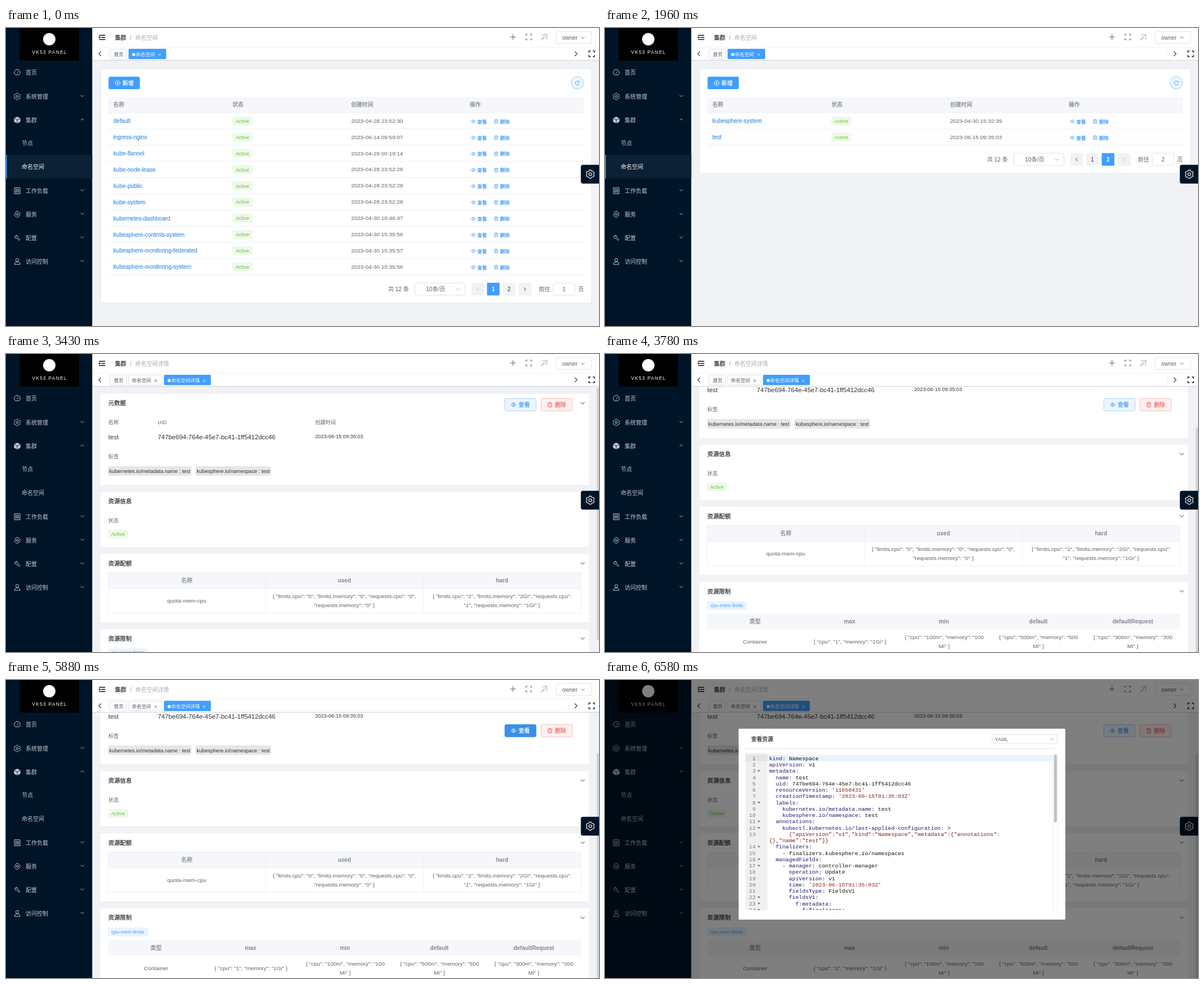
These frames come from a looping animation (1055x531 px, 7140 ms). An HTML page with a canvas:

```html
<!DOCTYPE html>
<html lang="zh-CN">
<head>
<meta charset="utf-8">
<style>
html, body { margin: 0; width: 100%; height: 100%; overflow: hidden; background: #f0f2f5; }
canvas { display: block; }
</style>
</head>
<body>
<canvas id="stage" width="1055" height="531"></canvas>
<script>
const W = 1055, H = 531, LOOP = 7140;
const SANS = '"Liberation Sans", "Noto Sans CJK SC", "Noto Sans CJK", sans-serif';
const MONO = '"Liberation Mono", monospace';
const BLUE = '#409eff', NAVY = '#001428', INK = '#303133', TEXT = '#606266', MUTED = '#909399', LINE = '#ebeef5';
let c = document.getElementById('stage').getContext('2d');

const ICON = {
  down: 'M-3-1.5L0 1.5L3-1.5', up: 'M-3 1.5L0-1.5L3 1.5',
  left: 'M2-4L-2 0L2 4', right: 'M-2-4L2 0L-2 4',
  cross: 'M-2.3-2.3L2.3 2.3M2.3-2.3L-2.3 2.3',
  plus: 'M-5 0H5M0-5V5',
  full: 'M-5-2V-5H-2M2-5H5V-2M5 2V5H2M-2 5H-5V2',
  wand: 'M-5.5 5.5L.5-.5M1-5.5V-3.2M3.2-1H5.5M-3.6-4.6L-1.6-2.8M5-5L2.6-2.6M2.8 1.6L4.6 3.6',
  fold: 'M-5.5-3.7H5.5M-1.2 0H5.5M-5.5 3.7H5.5M-4.9-.7L-3.4 0L-4.9 .7Z',
  eye: 'M-5 0Q0-7 5 0Q0 7-5 0ZM1.7 0A1.7 1.7 0 1 1-1.7 0A1.7 1.7 0 1 1 1.7 0',
  trash: 'M-4.5-3H4.5M-1.7-3V-4.6H1.7V-3M-3.5-3V4.6H3.5V-3M-1.2-.8V2.6M1.2-.8V2.6',
  add: 'M4.2 0A4.2 4.2 0 1 1-4.2 0A4.2 4.2 0 1 1 4.2 0M-2 0H2M0-2V2',
  reload: 'M3.2-1.8A3.7 3.7 0 1 0 3.6 1M3.5-4V-1.7H1.2',
  gauge: 'M-3.4 4.3A5.3 5.3 0 1 1 3.4 4.3ZM0 1.5L2-1.8',
  hexagon: 'M0-5.6L5.2-2.9V2.9L0 5.6L-5.2 2.9V-2.9Z',
  edges: 'M-5.2-2.9L0-.2L5.2-2.9M0-.2V5.6',
  sliders: 'M-5-5.3H5V5.3H-5ZM-2.4-3.5V3.5M0-3.5V3.5M2.4-3.5V3.5M-3.2 1.5H-1.6M-.8-1.5H.8M1.6 1H3.2',
  flower: 'M1.6 0A1.6 1.6 0 1 1-1.6 0A1.6 1.6 0 1 1 1.6 0M0-5.3C3-5.3 2-2.7 3.5-2.7S6 0 4 0S6 3 3.5 3S3 5.3 0 5.3S-2 3-3.5 3S-6 0-4 0S-5-2.7-3.5-2.7S-3-5.3 0-5.3',
  wrench: 'M-1-4.6A3.2 3.2 0 0 0-4.3-.6A3.2 3.2 0 0 0-.8 .5L3.2 4.6L4.8 3L.6-1A3.2 3.2 0 0 0-.4-4.4L-2.2-2.4L-3-3.2',
  user: 'M2.7-2.6A2.7 2.7 0 1 1-2.7-2.6A2.7 2.7 0 1 1 2.7-2.6M-5 5.2Q-5 .8 0 .8Q5 .8 5 5.2Z',
  gear: gearPath(5.4)
};

function gearPath(r) {
  let d = '';
  for (let i = 0; i < 48; i++) {
    const a = i * Math.PI / 24, k = r * (1 + 0.11 * Math.tanh(3 * Math.cos(6 * a + Math.PI)));
    d += (i ? 'L' : 'M') + (k * Math.cos(a)).toFixed(2) + ' ' + (k * Math.sin(a)).toFixed(2);
  }
  return d + 'ZM2 0A2 2 0 1 1-2 0A2 2 0 1 1 2 0';
}

// timing helpers
const ramp = (t, a, b) => Math.min(1, Math.max(0, (t - a) / (b - a)));
const smooth = p => p * p * (3 - 2 * p);
function ease(p) {
  // CSS "ease": cubic-bezier(.25, .1, .25, 1)
  let lo = 0, hi = 1, u = p;
  for (let i = 0; i < 18; i++) {
    u = (lo + hi) / 2;
    const x = 0.75 * u * (1 - u) + u * u * u;
    if (x < p) lo = u; else hi = u;
  }
  return 0.3 * u * (1 - u) * (1 - u) + 3 * u * u * (1 - u) + u * u * u;
}
const hex = s => [1, 3, 5].map(i => parseInt(s.substr(i, 2), 16));
function mix(a, b, p) {
  const x = hex(a), y = hex(b);
  return `rgb(${x.map((v, i) => Math.round(v + (y[i] - v) * p))})`;
}

// drawing helpers; y of text is its optical middle
function text(s, x, y, color, size = 10, align = 'left', weight = 400, font = SANS) {
  c.font = `${weight} ${size}px ${font}`;
  c.textAlign = align;
  c.fillStyle = color;
  c.fillText(s, x, y + size * 0.36);
  if (weight === 500) {
    c.strokeStyle = color;
    c.lineWidth = 0.25;
    c.strokeText(s, x, y + size * 0.36);
  }
}
function rect(x, y, w, h, color) {
  c.fillStyle = color;
  c.fillRect(x, y, w, h);
}
function box(x, y, w, h, r, fill, border) {
  c.beginPath();
  c.roundRect(x, y, w, h, r);
  if (fill) { c.fillStyle = fill; c.fill(); }
  if (border) { c.strokeStyle = border; c.lineWidth = 0.9; c.stroke(); }
}
function dot(x, y, r, fill) {
  c.beginPath();
  c.arc(x, y, r, 0, 7);
  c.fillStyle = fill;
  c.fill();
}
function icon(name, x, y, color, scale = 1, width = 1, fill) {
  const path = new Path2D(ICON[name]);
  c.save();
  c.translate(x, y);
  c.scale(scale, scale);
  c.strokeStyle = color;
  c.lineWidth = width / scale;
  if (fill) { c.fillStyle = fill; c.fill(path); }
  c.stroke(path);
  c.restore();
}
const pool = [];
let depth = 0;
function layer(alpha, dx, dy, draw) {
  if (alpha <= 0) return;
  const outer = c;
  if (alpha < 1) {
    const cv = pool[depth] || (pool[depth] = Object.assign(document.createElement('canvas'), { width: W, height: H }));
    c = cv.getContext('2d');
    c.clearRect(0, 0, W, H);
  }
  depth++;
  c.save();
  c.translate(dx, dy);
  draw();
  c.restore();
  depth--;
  if (alpha < 1) {
    const cv = c.canvas;
    c = outer;
    c.globalAlpha = alpha;
    c.drawImage(cv, 0, 0);
    c.globalAlpha = 1;
  }
}

const MENU = [
  ['首页', 79, 'gauge'], ['系统管理', 122, 'gear', 'down'], ['集群', 164, 'cube', 'up'],
  ['工作负载', 290, 'sliders', 'down'], ['服务', 332, 'flower', 'down'],
  ['配置', 374, 'wrench', 'down'], ['访问控制', 416, 'user', 'down']
];
function sidebar(t) {
  const width = 153.4;
  rect(0, 0, width, H, NAVY);
  rect(24, 0, 106, 58, '#000');
  dot(77, 20, 11, '#fff');
  c.letterSpacing = '1.3px';
  text('VK53 PANEL', 77.5, 43, '#fff', 8.4, 'center');
  c.letterSpacing = '0px';
  const on = 1 - ramp(t, 2430, 2660), grey = '#c3cad3';
  c.globalAlpha = on;
  rect(0, 226, width, 42, '#0c2135');
  rect(0, 226, 1.5, 42, BLUE);
  c.globalAlpha = 1;
  for (const [label, y, pic, arrow] of MENU) {
    if (pic === 'cube') {
      icon('hexagon', 20, y, grey, 1, 0.8, grey);
      icon('edges', 20, y, NAVY, 1, 0.9);
    } else icon(pic, 20, y, grey);
    text(label, 35, y, grey);
    if (arrow) icon(arrow, 135.7, y - 1, grey, 0.95, 0.9);
  }
  text('节点', 28, 205, grey);
  text('命名空间', 28, 247, mix(grey, '#ffffff', on));
}

function tab(x, w, label, active, closable) {
  box(x + 0.5, 37.5, w - 1, 17.5, 1, active ? BLUE : '#fff', active ? BLUE : '#d8dce5');
  const ink = active ? '#fff' : '#495060';
  if (active) dot(x + 9.3, 47.3, 2.8, '#fff');
  text(label, x + (active ? 13 : closable ? 6 : 7), 47, ink, 8.5);
  if (closable) icon('cross', x + w - 11.7, 47.6, ink, 1, 0.8);
}
function header(t) {
  const detail = t >= 2450;
  rect(153, 0, W - 153, 58, '#fff');
  rect(153, 34, W - 153, 0.8, '#eef0f3');
  rect(153, 57, W - 153, 1.2, '#d5d8dd');
  icon('fold', 171, 16.7, '#111', 1, 1.5);
  text('集群', 194, 17, INK, 10, 'left', 500);
  text('/', 220.5, 17, MUTED);
  c.globalAlpha = detail ? ramp(t, 2450, 2850) : 1;
  text(detail ? '命名空间详情' : '命名空间', 230, 17, '#a0a8b4');
  c.globalAlpha = 1;
  icon('plus', 902, 16, '#5a5e66');
  icon('full', 930, 16, '#5a5e66');
  icon('wand', 958, 16, '#5a5e66');
  box(979, 6, 63, 21.5, 3, '#fff', '#dcdfe6');
  text('owner', 989.5, 17, TEXT, 10);
  icon('down', 1026, 17, TEXT);
  icon('left', 167, 46, INK, 1, 1.1);
  rect(182, 40, 0.8, 12, '#eceef2');
  rect(1000, 40, 0.8, 12, '#eceef2');
  icon('right', 1014, 46, INK, 1, 1.1);
  icon('full', 1042, 46, '#222', 1, 1.4);
  tab(185, 29.5, '首页');
  if (detail) {
    tab(218, 60, '命名空间', false, true);
    tab(281, 83.5, '命名空间详情', true, true);
  } else tab(218, 67, '命名空间', true, true);
}

const PAGES = [[
  ['default', '04-28 23:52:30'], ['ingress-nginx', '06-14 09:59:07'], ['kube-flannel', '04-29 00:19:14'],
  ['kube-node-lease', '04-28 23:52:28'], ['kube-public', '04-28 23:52:28'], ['kube-system', '04-28 23:52:28'],
  ['kubernetes-dashboard', '04-30 16:46:47'], ['kubesphere-controls-system', '04-30 15:35:56'],
  ['kubesphere-monitoring-federated', '04-30 15:35:57'], ['kubesphere-monitoring-system', '04-30 15:35:56']
], [['kubesphere-system', '04-30 15:32:39'], ['test', '06-15 09:35:03']]];
const ROW = 28.88;

function statusTag(x, y) {
  box(x + 0.5, y - 7, 34, 13.7, 2.5, '#f0f9eb', '#e1f3d8');
  text('Active', x + 17.5, y, '#67c23a', 8.9, 'center');
}
function pager(y, t) {
  const page = t < 1190 ? 1 : 2, top = y - 11.2;
  text('共 12 条', 680, y, TEXT);
  box(727.5, top, 89, 22, 2.5, '#fff', '#dcdfe6');
  text('10条/页', 764.5, y, TEXT, 10, 'center');
  icon('down', 804, y, '#a8abb2');
  const cell = (x, on) => box(x, top, 22.5, 22.4, 1.5, on ? BLUE : '#f0f2f5');
  cell(828);
  icon('left', 839, y, page === 1 ? '#b8bcc6' : INK, 0.7);
  for (const n of [1, 2]) {
    const x = 827.7 + 28 * n, hover = n === 2 && t >= 840;
    cell(x, n === page);
    text(n, x + 11.3, y, n === page ? '#fff' : hover ? BLUE : INK, 10, 'center', n === page ? 700 : 400);
  }
  cell(912);
  icon('right', 923, y, page === 2 ? '#b8bcc6' : INK, 0.7);
  text('前往', 948, y, TEXT);
  box(973.5, top, 38.5, 22, 2.5, '#fff', '#dcdfe6');
  text(page, 992.7, y, TEXT, 10, 'center');
  text('页', 1018, y, TEXT);
}
function list(t) {
  const rows = PAGES[t < 1260 ? 0 : 1], end = 151 + rows.length * ROW;
  box(168.3, 72.3, 873.4, end - 22, 2, '#fff', '#e4e7ed');
  box(182.5, 86.7, 55.5, 22.3, 2.5, BLUE);
  icon('add', 198.5, 98, '#fff');
  text('新增', 207.3, 98, '#fff', 10, 'left', 500);
  dot(1016.5, 97.7, 11.4, '#a0cfff');
  dot(1016.5, 97.7, 10.5, '#ecf5ff');
  icon('reload', 1016.5, 98, BLUE, 0.95);
  rect(182, 123, 846, 28, '#f5f7fa');
  [['名称', 191], ['状态', 403], ['创建时间', 614], ['操作', 825]].forEach(([s, x]) => text(s, x, 136.8, '#83868c', 9.8, 'left', 500));
  rect(182, 150.5, 846, 0.9, LINE);
  rows.forEach(([name, time], i) => {
    const y = 165.8 + i * ROW;
    if (name === 'test') rect(182, y - 14.5, 846, ROW, mix('#ffffff', '#f5f7fa', ramp(t, 1940, 2170)));
    rect(182, y + 13.6, 846, 0.9, LINE);
    text(name, 191, y, '#4798e4', 10.1, 'left', 500);
    statusTag(403, y);
    text('2023-' + time, 614, y - 0.6, TEXT, 9.95);
    icon('eye', 831.3, y + 0.6, BLUE, 0.8, 0.8);
    text('查看', 838.5, y + 0.8, BLUE, 8.5, 'left', 500);
    icon('trash', 872, y + 0.6, BLUE, 0.75, 0.8);
    text('删除', 879, y + 0.8, BLUE, 8.5, 'left', 500);
  });
  pager(end + 25.5, t);
}

function card(y, h, title) {
  rect(168, y, 869, h, '#fff');
  rect(168, y + h - 0.8, 869, 0.9, '#e4e7ed');
  text(title, 182, y + 16.7, INK, 10.4, 'left', 500);
  icon('down', 1026, y + 16.5, INK, 1.15);
}
function chip(x, w, s) {
  box(x, 200, w, 17, 4, '#e6e6e6');
  text(s, x + w / 2, 208.7, INK, 9.2, 'center');
}
function cell(x, y, ...lines) {
  lines.forEach((s, i) => text(s, x, y + (i - (lines.length - 1) / 2) * 16, TEXT, 9.95, 'center'));
}
function heads(y, names, x0, step) {
  rect(182, y, 841, 28, '#f5f7fa');
  names.forEach((s, i) => text(s, x0 + i * step, y + 14, '#83868c', 10, 'center', /[a-z]/.test(s) ? 700 : 500));
}
function detailBody() {
  card(71, 164, '元数据');
  text('名称', 182, 121.5, TEXT, 9.2);
  text('UID', 270, 121.5, TEXT, 9.2);
  text('创建时间', 550, 121.5, TEXT, 9.2);
  text('test', 182, 148.5, INK, 11.4);
  text('747be694-764e-45e7-bc41-1ff5412dcc46', 270, 148.5, INK, 11.4);
  text('2023-06-15 09:35:03', 550, 147, INK, 9.2);
  text('标签', 182, 183, TEXT, 9.2);
  chip(181.5, 148.5, 'kubernetes.io/metadata.name : test');
  chip(337, 134.5, 'kubesphere.io/namespace : test');

  card(246, 99.5, '资源信息');
  text('状态', 182, 296.7, TEXT, 9.2);
  statusTag(181.5, 321.3);

  card(356.7, 122.8, '资源配额');
  heads(390, ['名称', 'used', 'hard'], 321.7, 280.4);
  c.strokeStyle = LINE;
  c.lineWidth = 0.9;
  c.strokeRect(181.8, 390, 841, 72);
  rect(182, 417.6, 841, 0.9, LINE);
  rect(461.5, 390, 0.9, 72, LINE);
  rect(742, 390, 0.9, 72, LINE);
  cell(321.5, 440, 'quota-mem-cpu');
  cell(602, 440, '{ "limits.cpu": "0", "limits.memory": "0", "requests.cpu": "0",', '"requests.memory": "0" }');
  cell(882.3, 440, '{ "limits.cpu": "2", "limits.memory": "2Gi", "requests.cpu":', '"1", "requests.memory": "1Gi" }');

  card(490.5, 150, '资源限制');
  box(182, 525.5, 69.5, 13.8, 2.5, '#ecf5ff', '#d9ecff');
  text('cpu-mem-limits', 216.7, 532.5, BLUE, 8.65, 'center');
  heads(547, ['类型', 'max', 'min', 'default', 'defaultRequest'], 267, 168);
  cell(267, 596.7, 'Container');
  cell(436, 596.7, '{ "cpu": "1", "memory": "1Gi" }');
  ['100', '500', '300'].forEach((m, i) => cell(603.5 + 167.8 * i, 596.7, `{ "cpu": "${m}m", "memory": "${m}`, 'Mi" }'));
  rect(182, 619, 841, 0.9, LINE);
}
function action(x, pic, label, fill, border, ink) {
  box(x + 0.5, 79.3, 55.5, 22, 2.5, fill, border);
  icon(pic, x + 16, 90.3, ink, 0.9);
  text(label, x + 25, 90.3, ink, 10, 'left', 500);
}
function detail(t) {
  const scroll = -1 + 85.5 * smooth(ramp(t, 3405, 3790)) - ease(ramp(t, 4960, 5320));
  c.save();
  c.translate(0, -scroll);
  detailBody();
  c.restore();
  rect(1051, 60 + Math.max(0, scroll) * 0.845, 4, 449, '#d0d2d6');
  const hover = t < 5950 ? ramp(t, 5500, 5600) : 0;
  const solid = t >= 5740 ? '#3b8fe8' : BLUE;
  action(887, 'eye', '查看', mix('#ecf5ff', solid, hover), mix('#a0cfff', solid, hover), mix(BLUE, '#ffffff', hover));
  action(951.5, 'trash', '删除', '#fef0f0', '#fab6b6', '#f56c6c');
}

const YAML = `kind: Namespace
apiVersion: v1
metadata:
  name: test
  uid: 747be694-764e-45e7-bc41-1ff5412dcc46
  resourceVersion: '11650431'
  creationTimestamp: '2023-06-15T01:35:03Z'
  labels:
    kubernetes.io/metadata.name: test
    kubesphere.io/namespace: test
  annotations:
    kubectl.kubernetes.io/last-applied-configuration: >
      {"apiVersion":"v1","kind":"Namespace","metadata":{"annotations":
{},"name":"test"}}
  finalizers:
    - finalizers.kubesphere.io/namespaces
  managedFields:
    - manager: controller-manager
      operation: Update
      apiVersion: v1
      time: '2023-06-15T01:35:03Z'
      fieldsType: FieldsV1
      fieldsV1:
        f:metadata:
          f:finalizers:`.split('\n');

function editor(t) {
  const size = 9.79, adv = size * 0.6, pitch = 11.25;
  const code = (s, col, y, color) => text(s, 292 + col * adv, y, color, size, 'left', 400, MONO);
  c.save();
  c.beginPath();
  c.rect(250, 130, 556, 280);
  c.clip();
  if (t < 6230) {
    rect(250, 130, 19, 280, '#f4f4f4');
    rect(269, 130, 0.8, 280, '#bbb');
    rect(796, 130, 10, 280, '#f4f4f4');
    c.restore();
    return;
  }
  rect(250, 130, 39, 280, '#f0f0f0');
  rect(250, 133.5, 39, 11.3, '#e4e4e4');
  rect(289, 133.5, 508, 11.3, '#e8f2fe');
  rect(796.5, 130, 0.8, 280, '#e8e8e8');
  rect(805.2, 130, 0.8, 280, '#ececec');
  box(798.7, 133, 5.3, 120.5, 2.6, '#c1c1c1');
  let n = 0;
  YAML.forEach((s, i) => {
    const y = 139.4 + i * pitch, block = s.trim()[0] === '{';
    if (s[0] !== '{') {
      text(++n, 268, y, '#7a7a7a', size, 'right', 400, MONO);
      if (t >= 6580 && !block && /[:>]$|- manager/.test(s)) {
        c.fillStyle = '#666';
        c.fill(new Path2D(`M271.5 ${y - 1.2}h4.4l-2.2 3.4z`));
      }
    }
    const m = !block && s.match(/^(\s*(?:- )?)(\S+?:)( .*|)$/);
    if (!m) return code(s, 0, y, block ? '#7d1a1a' : '#111');
    code(m[1], 0, y, '#111');
    code(m[2], m[1].length, y, '#1d1470');
    code(m[3], m[1].length + m[2].length, y, m[3][1] === "'" ? '#9b1c1c' : '#111');
  });
  c.restore();
}
function dialog(t) {
  const p = ease(ramp(t, 5890, 6190));
  layer(p, 0, 0, () => {
    rect(0, 0, W, H, 'rgba(0,0,0,.5)');
    layer(p, 0, -14.2 * (1 - p), () => {
      box(237.7, 86.7, 581.3, 340.3, 1.5, '#fff');
      text('查看资源', 260, 105, INK, 9.8, 'left', 500);
      box(689, 97.3, 115.5, 16.4, 2, '#fff', '#dcdfe6');
      text('YAML', 693.5, 105.7, TEXT, 8.9);
      icon('down', 795, 105.5, '#a8abb2');
      rect(246, 121.7, 554, 0.9, '#dcdfe6');
      editor(t);
    });
  });
}

function draw(t) {
  rect(0, 0, W, H, '#f0f2f5');
  c.save();
  c.beginPath();
  c.rect(153, 58, W - 153, H - 58);
  c.clip();
  const out = ease(ramp(t, 2420, 2730)), into = ease(ramp(t, 2750, 3100));
  layer(1 - out, 21 * out, 0, () => list(t));
  layer(into, -21 * (1 - into), 0, () => detail(t));
  c.restore();
  header(t);
  sidebar(t);
  box(1022.7, 243.7, 36, 33.6, 4, NAVY);
  icon('gear', 1039.5, 260.5, '#fff', 1.25, 1.2);
  dialog(t);
}

const start = performance.now();
function tick() {
  draw((performance.now() - start) % LOOP);
  requestAnimationFrame(tick);
}
tick();
</script>
</body>
</html>
```
